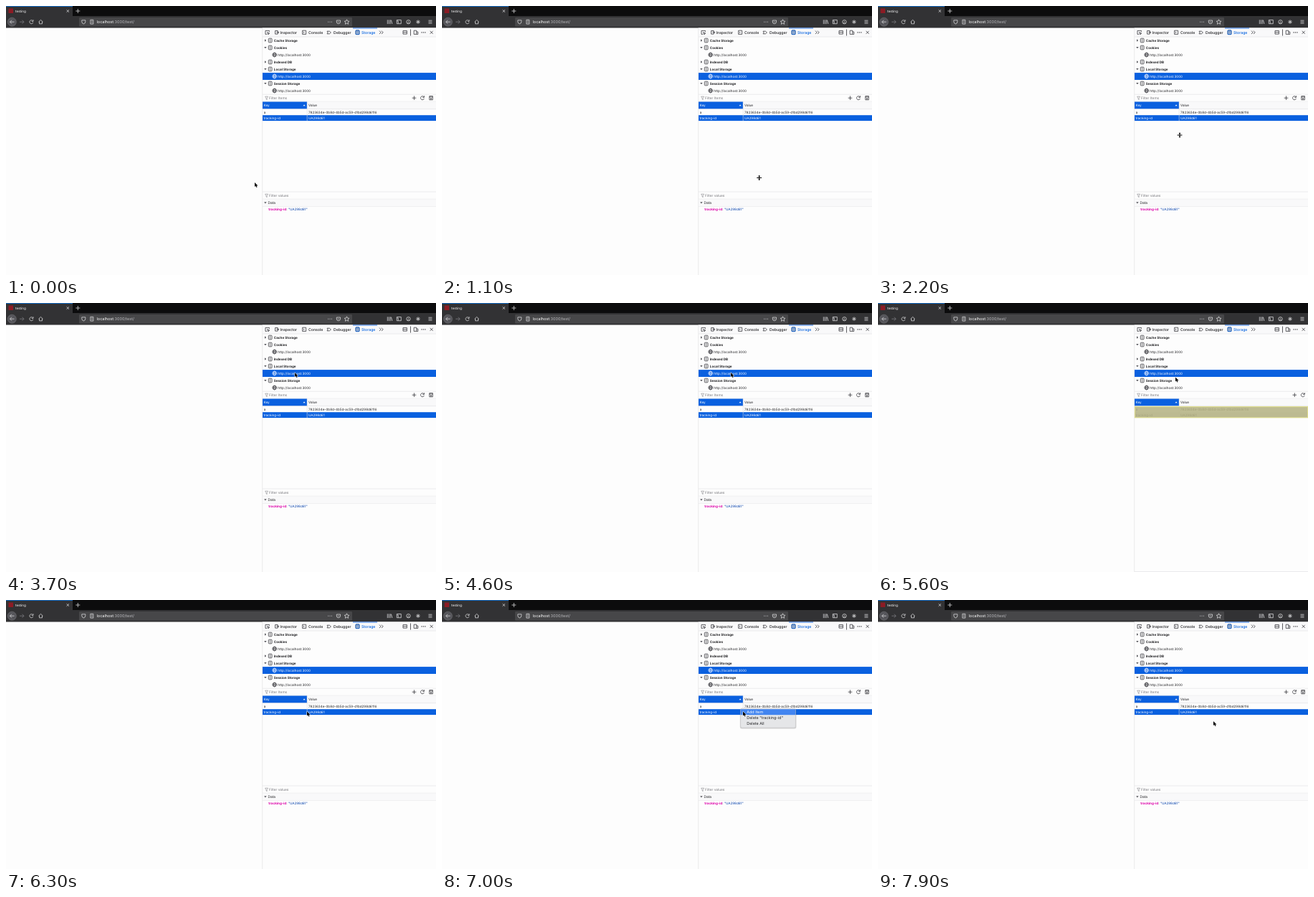
An HTML page for the animation above (8 s loop, 600 by 375 pixels).

```html
<!DOCTYPE html>
<html lang="en">
<head>
<meta charset="utf-8">
<title>Storage inspector</title>
<style>
html, body { margin: 0; width: 100%; height: 100%; overflow: hidden; background: #fdfdfd; }
svg { display: block; width: 600px; height: 375px; }
text { font: 4.6px Inter, sans-serif; fill: #202023; text-rendering: geometricPrecision; white-space: pre; }
.bold { font-weight: 700; }
.tab { font-size: 5.2px; font-weight: 500; }
.hint { font-size: 4.8px; fill: #77777c; }
.light, .row.on text { fill: #fff; }
.blue { fill: #0a60df; }
.bar { fill: #f9f9fa; }
.rule { stroke: #dedee1; stroke-width: .6; }
.icon { fill: none; stroke: #38383d; stroke-width: .8; }
.pale { stroke: #d8d8da; }
.act { stroke: #0060df; }
.item text { font-size: 5.4px; }
.item rect { fill: none; }
.item.on rect { fill: #4285f0; }
.item.on text { fill: #fff; }
.row rect { fill: #ededf0; }
.row.on rect { fill: #0a60df; }
</style>
</head>
<body>
<svg viewBox="0 0 600 375">
  <defs>
    <g id="globe" class="icon"><circle r="2.8"/><ellipse rx="1.2" ry="2.8"/><path d="M-2.8 0h5.6"/></g>
    <g id="reload" class="icon"><path d="M2 -1.5A2.5 2.5 0 1 0 2.4 .8M2.6 -3v2.2H.4"/></g>
    <g id="db" class="icon"><rect x="-2.4" y="-2.8" width="4.8" height="5.6" rx="1"/><path d="M-1 -1h2M-1 1h2"/></g>
    <path id="close" class="icon" d="M-2 -2 2 2M2 -2-2 2"/>
    <path id="plus" class="icon" d="M-2.8 0h5.6M0-2.8v5.6"/>
    <path id="funnel" d="M-2-2h4L.6 .2v2.2l-1.2-.7V.2Z" fill="none" stroke="#85858a" stroke-width=".6"/>
    <path id="dots" class="icon" d="M-3 0h1.2M-.6 0h1.2M1.8 0h1.2" style="stroke-width:1.2"/>
  </defs>

  <!-- browser chrome -->
  <rect width="600" height="14" fill="#0c0c0d"/>
  <rect width="93" height="14" fill="#323234"/>
  <rect width="93" height=".7" fill="#0a84ff"/>
  <rect y="14" width="600" height="16.5" fill="#323234"/>
  <rect x="102" y="16" width="381" height="12.5" rx="1.2" fill="#474749"/>
  <rect x="3.5" y="3.5" width="6.5" height="6.5" fill="#8c1c25"/>
  <text x="13" y="8.8" class="light">testing</text>
  <text x="126.5" y="24.2" style="font-size:5.5px" fill="#fff"><tspan fill="#fff">localhost</tspan><tspan fill="#b9b9bc">:3000/test/</tspan></text>
  <circle cx="8.3" cy="22.2" r="6" fill="#55555a" stroke="#747478" stroke-width=".6"/>
  <g id="chrome">
    <path class="icon pale" d="M11.5 22.2h-6m2.5-2.5-2.5 2.5 2.5 2.5"/>
    <path class="icon" stroke="#87878a" style="stroke:#7c7c80" d="M19 22.2h6m-2.5-2.5 2.5 2.5-2.5 2.5"/>
    <path class="icon pale" d="m45.5 22.2 3-2.8 3 2.8M46.5 21.8v3h4v-3"/>
    <path class="icon pale" d="M105.8 19.8h5v2q0 2.6-2.5 3.2-2.5-.6-2.5-3.2Z"/>
    <path class="icon pale" d="M117.8 19.3h4v5.8h-4ZM119 21h1.6M119 23h1.6"/>
    <path class="icon pale" d="M461.3 20h5.2v2q0 2.6-2.6 2.8-2.6-.2-2.6-2.8ZM462.8 21.6l1.1 1.1 1.1-1.1"/>
    <path class="icon pale" d="m475.5 18.8 1 2.2 2.4.3-1.8 1.6.5 2.4-2.1-1.2-2.1 1.2.5-2.4-1.8-1.6 2.4-.3Z"/>
    <path class="icon pale" d="M532.3 19.3v5.8M534.3 19.3v5.8M536.3 19.3v5.8M537.4 19.6l1.5 5.4"/>
    <path class="icon pale" d="M545.3 19.5h6v5.2h-6ZM545.3 21h2v3.5"/>
    <circle class="icon pale" cx="561.5" cy="22.2" r="2.7"/>
    <path class="icon pale" d="M560 24q1.5-1.5 3 0M561.5 20.8v1.2"/>
    <path class="icon pale" d="M575 19.4v5.6M572.2 22.2h5.6M573 20.2l4 4M577 20.2l-4 4"/>
    <path class="icon pale" d="M589.5 20.2h5M589.5 22.2h5M589.5 24.2h5"/>
    <use href="#dots" x="452" y="22.2" style="--c:#fff"/>
  </g>
  <path class="icon pale" d="M84.6 5.3l3.4 3.4M88 5.3l-3.4 3.4M97.3 7h6M100.3 4v6"/>
  <path class="icon pale" d="M37.4 20.7a2.5 2.5 0 1 0 .4 2.3M38 19.2v2.2h-2.2M449 22.2h1.2M451.4 22.2h1.2M453.8 22.2h1.2"/>

  <!-- developer tools -->
  <path class="rule" d="M357.7 30.5V375"/>
  <rect class="bar" x="358" y="30.5" width="242" height="12.5"/>
  <rect class="blue" x="484" y="30.5" width="34" height=".9"/>
  <path class="rule" d="M358 43h242"/>
  <path class="icon" d="M364 39.4h-2v-5h5.4v1.6M364.6 36.6l1.2 3.4.7-1.3 1.3-.6Z"/>
  <path class="icon" d="M375.6 34.5h3.6v4.6h-3.6ZM377.4 36.8h3.2m-1.2-1.2 1.2 1.2-1.2 1.2"/>
  <path class="icon" d="M413.6 34.2h5v5.2h-5ZM414.9 35.7l1.2 1.1-1.2 1.1"/>
  <path class="icon" d="M448 35.2h3.4l2 1.8-2 1.8H448l1.2-1.8Z"/>
  <use href="#db" x="490.5" y="36.8"/>
  <path class="icon act" d="M488.1 34h4.8v5.6h-4.8ZM489.5 35.8h2M489.5 37.8h2"/>
  <path class="icon" d="m521 34.6 2.2 2.2-2.2 2.2m3-4.4 2.2 2.2-2.2 2.2"/>
  <path class="icon" d="M554 34.5h5.4v4.6H554ZM554 36.8h5.4M569.2 34.2h3.6v5.2h-3.6ZM572.8 36h2v3.4h-2M564.5 32.5v9" />
  <use href="#dots" x="582.5" y="36.8"/>
  <use href="#close" x="593.7" y="36.8"/>
  <text class="tab" x="382.6" y="38.7">Inspector</text>
  <text class="tab" x="422" y="38.7">Console</text>
  <text class="tab" x="457" y="38.7">Debugger</text>
  <text class="tab" x="496" y="38.7" style="fill:#0060df">Storage</text>

  <g id="tree"></g>

  <path class="rule" d="M358 123.2h242M358 133.2h242"/>
  <use href="#funnel" x="363.6" y="128.2"/>
  <text class="hint" x="367" y="129.9">Filter Items</text>
  <g id="tools">
    <use href="#plus" x="569.5" y="128.2"/>
    <use href="#reload" x="581" y="128.2"/>
  </g>

  <rect class="bar" x="420" y="133.5" width="180" height="10"/>
  <rect class="blue" x="358" y="133.5" width="62" height="10"/>
  <path d="M414.5 139.2l1.6-1.8 1.6 1.8Z" fill="#fff"/>
  <text class="light" x="359.5" y="140.2">Key</text>
  <text x="422" y="140.2">Value</text>
  <text x="359.8" y="149.6">a</text>
  <text x="422" y="149.6">7823634e-0b8d-4b5d-ac59-d1bd298d6116</text>
  <g id="row" class="row">
    <rect x="358" y="152.2" width="242" height="7.9"/>
    <text x="359.5" y="157.9">tracking-id</text>
    <text x="422" y="157.9">UA298d61</text>
  </g>
  <path class="rule" d="M358 143.6h242M420.2 133.5V160"/>
  <g id="flash">
    <rect x="358.4" y="144.6" width="241.2" height="15.2" fill="#b6b485" stroke="#dcda78" stroke-width="1"/>
  </g>

  <g id="side">
    <path class="icon" d="M590.8 125.6h4.6v5.2h-4.6ZM590.8 127h4.6M593.1 128v2m-1-1 1 1 1-1"/>
    <path class="rule" d="M358 259h242M358 269.2h242M358 279.2h242"/>
    <use href="#funnel" x="363.6" y="264.2"/>
    <text class="hint" x="367" y="265.9">Filter values</text>
    <rect class="bar" x="358" y="269.5" width="242" height="9.5"/>
    <path d="M360.2 273.2h3.4l-1.7 2.2Z" fill="#55555a"/>
    <text x="365.5" y="275.8" style="font-size:4.8px">Data</text>
    <text x="366.3" y="285"><tspan class="bold" fill="#dd00a9">tracking-id</tspan>: <tspan fill="#003eaa">"UA298d61"</tspan></text>
  </g>
  <path id="foot" class="rule" d="M358 374.5h242"/>

  <g id="menu">
    <rect x="415.8" y="151.6" width="78.6" height="28" rx="2.5" opacity=".16"/>
    <rect x="416.6" y="151" width="76.8" height="27" rx="2" fill="#e5e6e8" stroke="#bcbcc0" stroke-width=".5"/>
  </g>

  <g id="arrow"><path d="M0 0v6l1.4-1.2 1 2.2 1.1-.5-.9-2.1h1.9Z" stroke="#fff" stroke-width=".9" paint-order="stroke"/></g>
  <g id="cross">
    <path d="M-3.4 0h6.8M0-3.4v6.8M-1.3-2.2 0-3.6l1.3 1.4M-1.3 2.2 0 3.6l1.3-1.4" fill="none" stroke="#fff" stroke-width="2"/>
    <path d="M-3.4 0h6.8M0-3v6" fill="none" stroke="#000" stroke-width="1.1"/>
    <path d="M-1.4-2 0-3.8l1.4 1.8ZM-1.4 2 0 3.8l1.4-1.8Z"/>
  </g>
</svg>
<script>
const $ = id => document.getElementById(id);
const LOOP = 8000, STEP = 100;

// Storage tree: [label, open, has child]
const groups = [
  ['Cache Storage', false], ['Cookies', true], ['Indexed DB', false],
  ['Local Storage', true], ['Session Storage', true]
];
let y = 48, tree = '';
for (const [label, open] of groups) {
  const twisty = open ? `M360.2 ${y - 1}h3.4l-1.7 2.2Z` : `M361 ${y - 1.7}v3.4l2.2-1.7Z`;
  tree += `<path d="${twisty}" fill="#55555a"/><use href="#db" x="368.7" y="${y}"/>
    <text class="bold" x="373.8" y="${y + 1.7}">${label}</text>`;
  y += 10;
  if (!open) continue;
  const chosen = label === 'Local Storage';
  if (chosen) tree += `<rect class="blue" x="358" y="${y - 4.9}" width="242" height="9.9"/>`;
  tree += `<g transform="translate(374.7 ${y})" class="icon" ${chosen ? 'style="stroke:#dbe8ff"' : ''}>
      <circle r="2.8"/><ellipse rx="1.2" ry="2.8"/><path d="M-2.8 0h5.6"/></g>
    <text ${chosen ? 'class="light"' : ''} x="379.3" y="${y + 1.7}">http://localhost:3000</text>`;
  y += 10;
}
$('tree').innerHTML = tree;

$('menu').innerHTML += ['Add Item', 'Delete "tracking-id"', 'Delete All'].map((label, i) =>
  `<g class="item"><rect x="416.8" y="${152.2 + 8 * i}" width="76.4" height="8"/>
   <text x="425.3" y="${158.2 + 8 * i}">${label}</text></g>`).join('');
const items = document.querySelectorAll('.item');

// Pointer stops: [time, x, y]
const stops = [
  [0, 347, 246], [600, 446, 255], [900, 446, 255], [1500, 433, 195], [2100, 433, 195],
  [2200, 421, 180], [2700, 396, 148], [2800, 396, 148], [3700, 403, 97], [4600, 403, 97],
  [5000, 415, 103.5], [5600, 415, 103.5], [6000, 420, 155.5], [7000, 420, 155.5],
  [7500, 468, 169], [LOOP, 468, 169]
];
const ease = p => p * p * (3 - 2 * p);
const clamp = p => Math.max(0, Math.min(1, p));

function pointer(t) {
  const i = stops.findIndex(s => s[0] > t);
  const [t0, x0, y0] = stops[i - 1], [t1, x1, y1] = stops[i];
  const p = ease((t - t0) / (t1 - t0));
  return [x0 + (x1 - x0) * p, y0 + (y1 - y0) * p];
}

const show = (id, on) => { $(id).style.opacity = +on; };

function draw(now) {
  const t = Math.floor(now % LOOP / STEP) * STEP;
  const [px, py] = pointer(t);
  const selected = t < 4700 || t >= 6100;
  const resizing = t >= 500 && t <= 2300;

  $('row').classList.toggle('on', selected);
  show('side', selected);
  show('foot', !selected);
  $('tools').setAttribute('transform', `translate(${selected ? 0 : 11.8})`);
  show('flash', .88 * clamp((t - 5200) / 300) * clamp((6000 - t) / 400));

  show('menu', clamp((t - 6600) / 100) * clamp((7800 - t) / 200));
  const hover = Math.floor((py - 152.2) / 8);
  items.forEach((item, i) => item.classList.toggle('on', i === hover));

  for (const id of ['arrow', 'cross']) $(id).setAttribute('transform', `translate(${px} ${py})`);
  show('arrow', !resizing);
  show('cross', resizing);
  requestAnimationFrame(draw);
}
requestAnimationFrame(draw);
</script>
</body>
</html>
```
